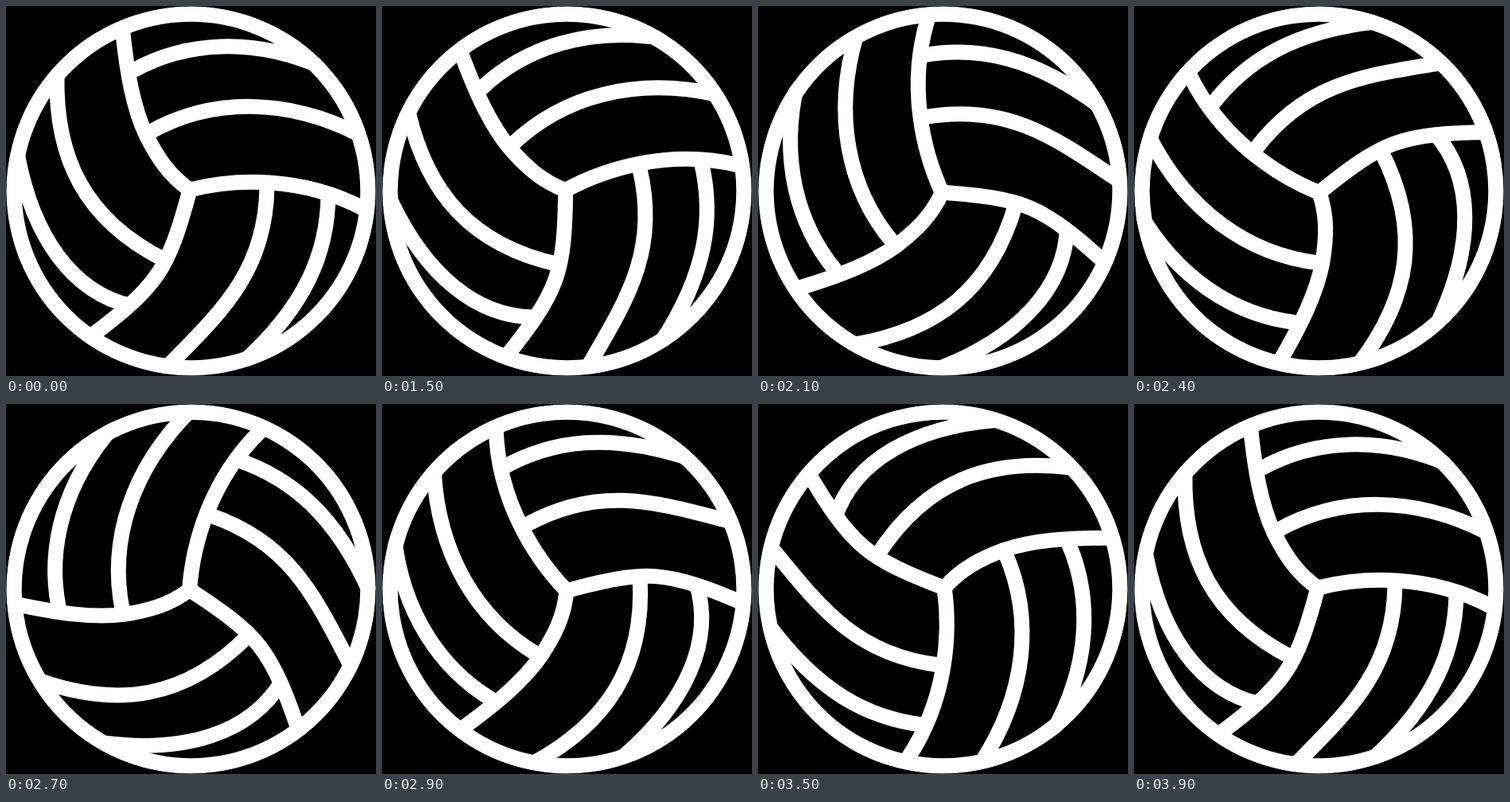
Recreate the animation shown at these times as an HTML page. Size 465x465 px, loop 4000 ms.

```html
<!DOCTYPE html>
<html lang="en">
<head>
<meta charset="utf-8">
<title>Spinning volleyball</title>
<style>
  html, body { margin: 0; width: 100%; height: 100%; overflow: hidden; background: #000; }
  svg { display: block; width: 100vw; height: 100vh; }
</style>
</head>
<body>
<svg viewBox="0 0 465 465">
  <clipPath id="disc"><circle cx="232.5" cy="232.5" r="232"/></clipPath>
  <g id="ball" fill="none" stroke="#fff" stroke-width="19" clip-path="url(#disc)">
    <circle cx="232.5" cy="232.5" r="222.5" stroke-width="19.5"/>
    <!-- main seams -->
    <path d="M146 25C152 85 160 128 176 162C190 190 205 213 231 231"/>
    <path d="M231 231C285 217.5 370 212.5 450 255"/>
    <path d="M231 231C218 280 207 313 190.5 337C172 364 143 388 108 414"/>
    <circle cx="231.5" cy="231.5" r="8" fill="#fff" stroke="none"/>
    <!-- panel seams -->
    <path d="M160 81C225 45 310 38 400 78"/>
    <path d="M180 159C258 115 353 115 445 162"/>
    <path d="M328 228C326 335 270 385 200 456"/>
    <path d="M405 238C404 311 376 377 299 447"/>
    <path d="M64 88C62 190 98 268 199 319"/>
    <path d="M15 190C34 288 82 360 158 377"/>
  </g>
</svg>
<script>
  const LOOP = 4000, REST = 1500, STEP = 100;
  const SLOW_STEPS = 10, SLOW = 360 / 25, FAST = 360 / 15;
  const ball = document.getElementById('ball');

  // Slow turn first, then a full faster turn back to rest.
  function angleAt(ms) {
    if (ms < REST) return 0;
    const n = Math.floor((ms - REST) / STEP) + 1;
    return n <= SLOW_STEPS ? -SLOW * n : -FAST * (n - SLOW_STEPS);
  }

  function draw(ms) {
    ball.setAttribute('transform', `rotate(${angleAt(ms)} 232.5 232.5)`);
  }

  const start = performance.now();
  function tick() {
    draw((performance.now() - start) % LOOP);
    requestAnimationFrame(tick);
  }
  tick();
</script>
</body>
</html>
```
